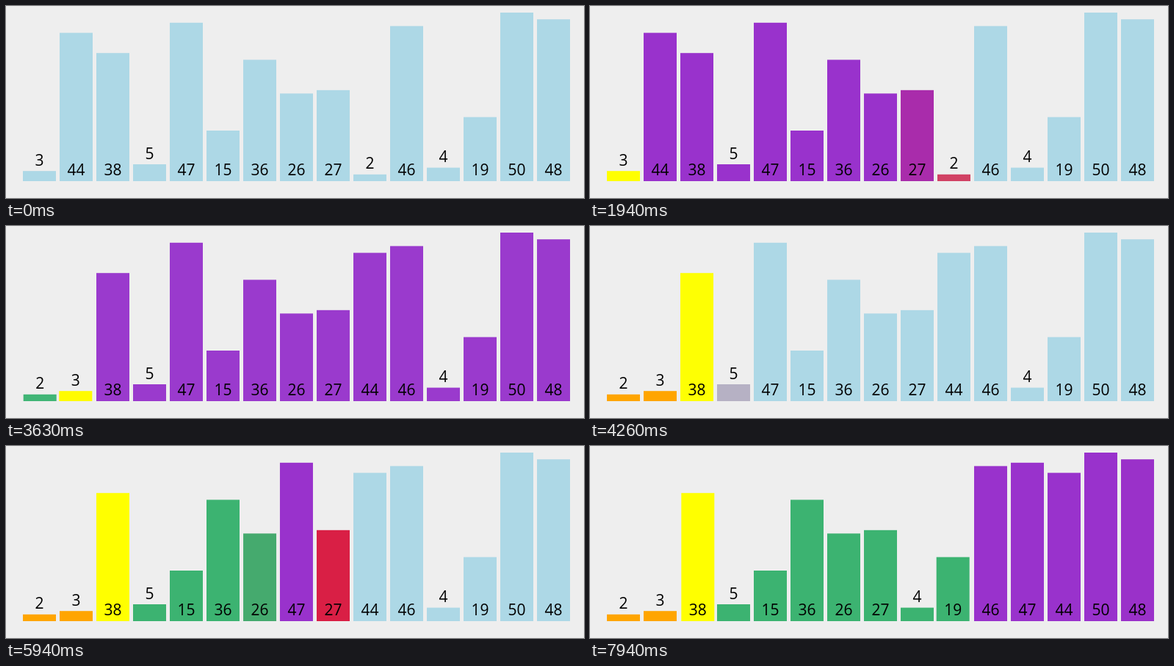
Animation of 787 by 262 pixels, one loop 8 s. Source, as an HTML page with a canvas:

```html
<!DOCTYPE html>
<html lang="en">
<head>
<meta charset="utf-8">
<title>Quicksort</title>
<style>
  html, body { margin: 0; width: 100%; height: 100%; overflow: hidden; background: #eee; }
  canvas { display: block; }
</style>
</head>
<body>
<canvas id="stage" width="787" height="262"></canvas>
<script>
const LOOP = 8000, TWEEN = 235, BASE = 239, UNIT = 4.6;
const IDLE = [173, 216, 230], PIVOT = [255, 255, 0], CHECK = [220, 20, 60],
      LESS = [60, 179, 113], MORE = [153, 50, 204], SORTED = [255, 165, 0];
const values = [3, 44, 38, 5, 47, 15, 36, 26, 27, 2, 46, 4, 19, 50, 48];

// Record the slot and colour every bar heads for in each step of the sort.
const order = values.map((_, id) => id);
const colors = values.map(() => IDLE);
const steps = [];

function record() {
  steps.push(values.map((_, id) => [order.indexOf(id), ...colors[id]]));
}

function swap(a, b) {
  if (a === b) return;
  [order[a], order[b]] = [order[b], order[a]];
  record();
}

function quicksort(from, to) {
  if (from > to) return;
  const pivot = order[from];
  if (from === to) {
    colors[pivot] = SORTED;
    record();
    return;
  }
  colors[pivot] = PIVOT;
  record();
  let last = from;
  for (let i = from + 1; i <= to; i++) {
    const id = order[i];
    colors[id] = CHECK;
    record();
    const less = values[id] < values[pivot];
    if (less) swap(i, ++last);
    colors[id] = less ? LESS : MORE;
  }
  record();
  swap(from, last);
  for (let i = from; i <= to; i++) colors[order[i]] = IDLE;
  colors[pivot] = SORTED;
  record();
  quicksort(from, last - 1);
  quicksort(last + 1, to);
}
quicksort(0, values.length - 1);

// Start time of a step; the pace drifts slightly between these [step, ms] points.
const pace = [[0, 28], [13, 2584], [25, 4970], [34, 6753], [40, 7918], [41, 8116]];

function startOf(step) {
  const k = pace.findIndex(([s]) => s > step);
  if (k < 0) return Infinity;
  const [s0, t0] = pace[k - 1], [s1, t1] = pace[k];
  return t0 + (t1 - t0) * (step - s0) / (s1 - s0);
}

const ease = u => u < 0.5 ? 4 * u ** 3 : 1 - 4 * (1 - u) ** 3;

// Each step interrupts the tween before it and continues from where that one got to.
function barsAt(time) {
  const bars = values.map((_, id) => [id, ...IDLE]);
  for (let n = 0; n < steps.length && startOf(n) < time; n++) {
    const elapsed = Math.min(time, startOf(n + 1)) - startOf(n);
    const p = ease(Math.min(1, elapsed / TWEEN));
    bars.forEach((bar, id) => bar.forEach((v, j) => {
      bar[j] = v + (steps[n][id][j] - v) * p;
    }));
  }
  return bars;
}

const ctx = document.getElementById('stage').getContext('2d');

function draw() {
  ctx.fillStyle = '#eee';
  ctx.fillRect(0, 0, 787, 262);
  ctx.font = '21px "Open Sans", "Noto Sans", sans-serif';
  ctx.textAlign = 'center';
  barsAt(performance.now() % LOOP).forEach(([slot, ...rgb], id) => {
    const x = 23 + 50 * slot, height = values[id] * UNIT;
    ctx.fillStyle = `rgb(${rgb.map(Math.round)})`;
    ctx.fillRect(x, BASE - height, 45, height);
    ctx.fillStyle = '#000';
    ctx.fillText(values[id], x + 22.5, height > 40 ? BASE - 8 : BASE - height - 7.5);
  });
  requestAnimationFrame(draw);
}
draw();
</script>
</body>
</html>
```
